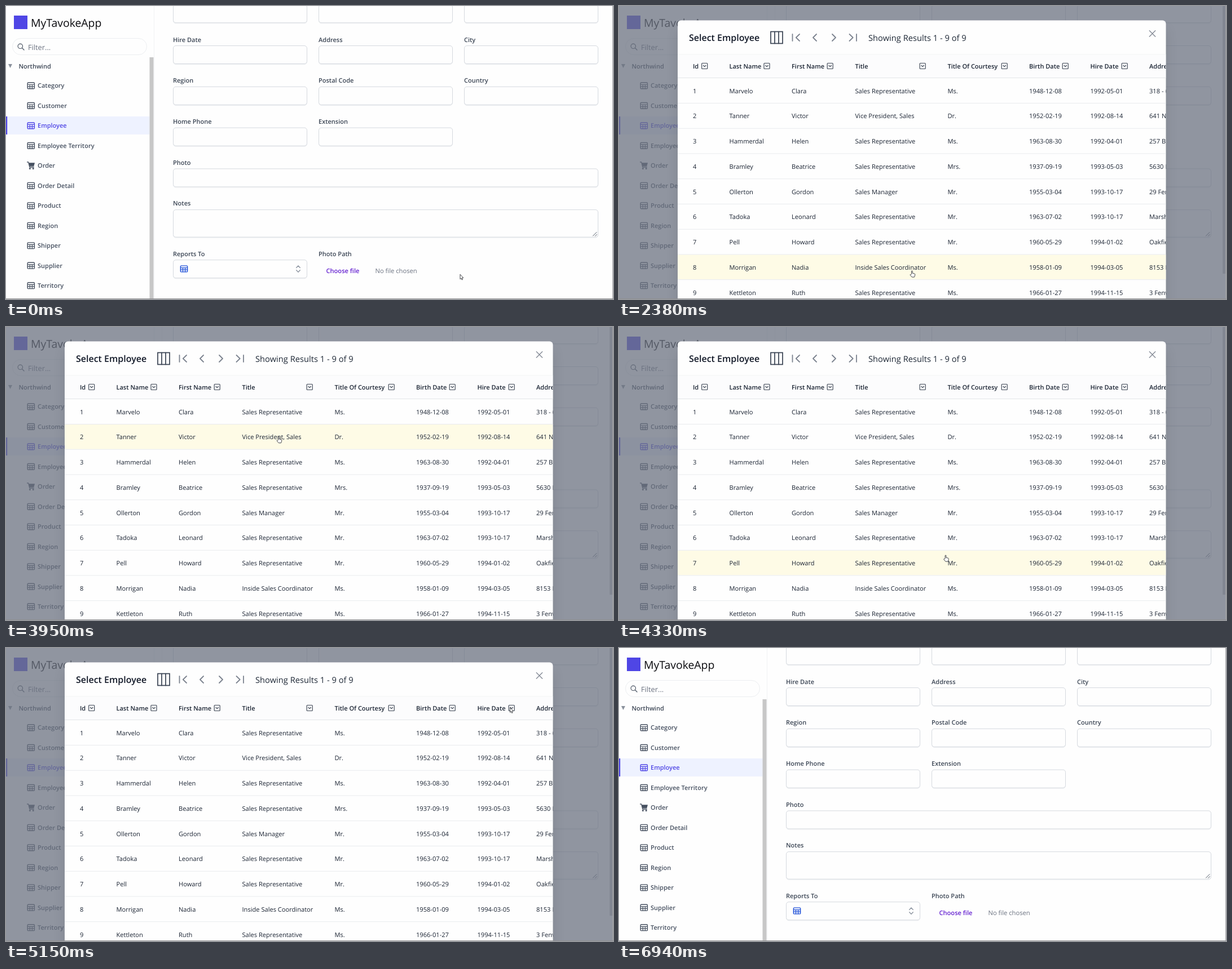
Write an HTML page that moves like this. It is 1076x520 px and loops after 7150 ms.

```html
<!DOCTYPE html>
<html lang="en">
<head>
<meta charset="utf-8">
<title>Employee picker</title>
<style>
  html, body { margin: 0; width: 100%; height: 100%; overflow: hidden; background: #fefefe; }
  svg { display: block; width: 100%; height: 100%; }
  text { font: 11px "Open Sans", "Noto Sans", sans-serif; text-rendering: geometricPrecision; white-space: pre; }
  .semi { font-weight: 600; }
  .line { fill: none; stroke-linecap: round; stroke-linejoin: round; }
  .field { fill: #fefefe; stroke: #d5d9df; }
  .modal-card { filter: drop-shadow(0 17px 10px rgba(0, 0, 0, .1)); }
</style>
</head>
<body>
<svg id="stage" viewBox="0 0 1076 520" xmlns="http://www.w3.org/2000/svg"></svg>
<script>
const LOOP = 7150;
const ROW_TOP = 128, ROW_HEIGHT = 44.75;
const INDIGO = '#4f46e5';

// Markup helpers
const text = (x, y, content, color, { size = 11, semi = false } = {}) =>
  `<text x="${x}" y="${y}" fill="${color}" style="font-size:${size}px"${semi ? ' class="semi"' : ''}>${content}</text>`;
const rect = (x, y, w, h, attrs) => `<rect x="${x}" y="${y}" width="${w}" height="${h}" ${attrs}/>`;
const line = (d, color, width = 1) => `<path class="line" d="${d}" stroke="${color}" stroke-width="${width}"/>`;
const label = (x, y, content) => text(x, y, content, '#3b4554', { semi: true });
const tableIcon = (x, y, color) => `<g transform="translate(${x} ${y})">` +
  rect(.7, .7, 12.2, 10.8, `rx="1.2" fill="none" stroke="${color}" stroke-width="1.4"`) +
  line('M.7 4.2H13M.7 7.8H13M4.8 4.2V11.4M8.9 4.2V11.4', color, 1.2) + '</g>';
const cartIcon = (x, y, color) => `<g transform="translate(${x} ${y})" fill="${color}">
  <path d="M3.3 2H14L12.3 8.2H4.7z"/><circle cx="5.4" cy="12.4" r="1.5"/><circle cx="11.2" cy="12.4" r="1.5"/>
  ${line('M.6.8H2.7L4.9 9.8H12.2', color, 1.3)}</g>`;
const field = (x, y, w = 237, h = 32) =>
  rect(x + .5, y + 1.5, w, h, 'rx="4.5" fill="none" stroke="#eceef1"') +
  rect(x + .5, y + .3, w, h, 'rx="4.5" class="field"');

function sidebar() {
  const items = ['Category', 'Customer', 'Employee', 'Employee Territory', 'Order', 'Order Detail',
    'Product', 'Region', 'Shipper', 'Supplier', 'Territory'];
  const list = items.map((name, i) => {
    const y = 141.3 + 35.48 * i;
    const color = name === 'Employee' ? INDIGO : '#465060';
    const icon = name === 'Order' ? cartIcon(37, y - 7, color) : tableIcon(37.5, y - 6, color);
    return icon + text(56, y + 4, name, color, { semi: true });
  }).join('');
  return rect(14, 17, 24, 24, `fill="${INDIGO}"`) +
    text(44, 37.2, 'MyTavokeApp', '#0b0b0f', { size: 19.4 }) +
    rect(11.5, 57.5, 238, 29, 'rx="14.5" fill="#fefefe" stroke="#eceef1"') +
    '<circle cx="25.3" cy="71.3" r="4.2" fill="none" stroke="#4b5563" stroke-width="1.2"/>' +
    line('M28.5 74.5L32 78', '#4b5563', 1.3) +
    text(39, 77.6, 'Filter...', '#6b7280', { size: 12.8 }) +
    '<path d="M4 103h7l-3.5 7z" fill="#8b929d"/>' +
    label(22.5, 111.3, 'Northwind') +
    rect(0, 196, 254.5, 32, 'fill="#eef2ff"') + rect(0, 196, 2.2, 32, `fill="${INDIGO}"`) + list +
    rect(254.5, 91, 7, 429, 'fill="#c7c7c7"') + rect(262, 0, 1, 520, 'fill="#f1f2f4"');
}

function form() {
  const columns = [296, 554, 812];
  const rows = [['', '', ''], ['Hire Date', 'Address', 'City'],
    ['Region', 'Postal Code', 'Country'], ['Home Phone', 'Extension']];
  const grid = rows.map((names, r) => names.map((name, c) => {
    const y = 70.2 + 72.8 * (r - 1);
    return label(columns[c], y - 6.7, name) + field(columns[c], y);
  }).join('')).join('');
  return grid +
    label(296, 281.8, 'Photo') + field(296, 288.6, 753) +
    label(296, 354.3, 'Notes') + field(296, 361.3, 753, 48.5) +
    line('M1040.5 408L1047 401.5M1044.5 408.3L1047.3 405.5', '#4b5563', 1) +
    label(296, 443.8, 'Reports To') + field(296, 450.4) +
    rect(296.7, 450.7, 237, 32, `id="selectRing" rx="4.5" fill="none" stroke="${INDIGO}" stroke-width="1.8"`) +
    tableIcon(308.7, 460.4, '#1d4ed8') +
    line('M514.7 464.5L518 461L521.3 464.5M514.7 468.7L518 472.2L521.3 468.7', '#8d95a1', 1.4) +
    label(554, 443.8, 'Photo Path') +
    `<g id="softParts">${rect(554, 454.5, 86.5, 30.5, 'rx="15.2" fill="#f5f3ff"')}
      ${rect(276, 0, 1, 503, 'fill="#f3f3f5"')}${rect(1070, 0, 5.5, 475, 'fill="#c7c7c7"')}</g>` +
    text(567.5, 474, 'Choose file', '#6420d0', { size: 11.1, semi: true }) +
    text(654.5, 474, 'No file chosen', '#6b7280', { size: 11.2 });
}

function modal() {
  const columnX = [131, 195.5, 306, 418.5, 582.5, 727, 835.5, 940];
  const headings = ['Id', 'Last Name', 'First Name', 'Title', 'Title Of Courtesy', 'Birth Date', 'Hire Date', 'Address'];
  const rep = 'Sales Representative';
  const people = [
    ['Marvelo', 'Clara', rep, 'Ms.', '1948-12-08', '1992-05-01', '318 - 6th'],
    ['Tanner', 'Victor', 'Vice President, Sales', 'Dr.', '1952-02-19', '1992-08-14', '641 N. Row'],
    ['Hammerdal', 'Helen', rep, 'Ms.', '1963-08-30', '1992-04-01', '257 Birch'],
    ['Bramley', 'Beatrice', rep, 'Mrs.', '1937-09-19', '1993-05-03', '5630 Low'],
    ['Ollerton', 'Gordon', 'Sales Manager', 'Mr.', '1955-03-04', '1993-10-17', '29 Fern'],
    ['Tadoka', 'Leonard', rep, 'Mr.', '1963-07-02', '1993-10-17', 'Marsh End'],
    ['Pell', 'Howard', rep, 'Mr.', '1960-05-29', '1994-01-02', 'Oakfield'],
    ['Morrigan', 'Nadia', 'Inside Sales Coordinator', 'Ms.', '1958-01-09', '1994-03-05', '8153 Elm'],
    ['Kettleton', 'Ruth', rep, 'Ms.', '1966-01-27', '1994-11-15', '3 Fenway'],
  ];
  const filters = [151.7, 262, 374.2, 538.2, 683.2, 791.2, 896.2].map(x =>
    rect(x - 5, 101.5, 10, 10, 'rx="1" fill="none" stroke="#3f4856" stroke-width="1.2"') +
    line(`M${x - 2.2} 105.5l2.2 2.2 2.2-2.2`, '#3f4856', 1.2)).join('');
  const body = people.map((person, r) => {
    const y = ROW_TOP + ROW_HEIGHT * r;
    return rect(104, y + ROW_HEIGHT - .8, 865.5, 1, 'fill="#e9ebee"') +
      [r + 1, ...person].map((cell, c) => text(columnX[c], y + 26.7, cell, '#1b2433', { size: 11.1 })).join('');
  }).join('');
  return rect(104, 25.4, 865.5, 570, 'rx="6" fill="#fefefe" class="modal-card"') +
    '<g clip-path="url(#card)">' +
    rect(104, 86, 865.5, 42, 'fill="#fcfcfd"') + rect(104, 85.5, 865.5, 1, 'fill="#f4f5f6"') +
    rect(104, 127, 865.5, 1, 'fill="#e3e5e9"') +
    rect(104, 0, 865.5, ROW_HEIGHT - .8, 'id="rowHover" fill="#fefbe6"') +
    headings.map((h, c) => text(columnX[c], 111, h, '#1b2433', { semi: true })).join('') +
    filters + body + '</g>' +
    text(124, 62.2, 'Select Employee', '#111827', { size: 16, semi: true }) +
    rect(269, 45.5, 21, 21, 'fill="none" stroke="#374151" stroke-width="1.7"') +
    line('M276 45.5V66.5M283 45.5V66.5', '#374151', 1.7) +
    line('M307.5 50V62M320 50L313.8 56L320 62M350 50L344 56L350 62M378 50L384 56L378 62M408.5 50L414.7 56L408.5 62M421 50V62',
      '#7c838f', 1.8) +
    text(442, 61.8, 'Showing Results 1 - 9 of 9', '#1f2937', { size: 14.7 }) +
    line('M940.3 43.8L950.7 54.2M950.7 43.8L940.3 54.2', '#858b96', 1.4) +
    rect(932.5, 36, 26, 26, 'id="closeRing" rx="6" fill="none" stroke="#6366f1" stroke-width="1.7"');
}

const stage = document.getElementById('stage');
stage.innerHTML = `<defs><clipPath id="card">${rect(104, 25.4, 865.5, 570, 'rx="6"')}</clipPath></defs>` +
  rect(0, 0, 1076, 520, 'fill="#fefefe"') + sidebar() + form() +
  rect(0, 0, 1076, 520, 'id="overlay" fill="#6b7280"') +
  `<g id="modal">${modal()}</g>` +
  `<g id="cursor" fill="#fff" stroke="#2f3136" stroke-width=".9" stroke-linejoin="round">
    <path id="arrow" d="M.5.3V8.8L2.4 7.2 3.7 10 5 9.4 3.8 6.7 6.2 6.3z"/>
    <path id="hand" d="M3 6.5V1.6c0-1.3 1.8-1.3 1.8 0V5l3.5.8c.8.2 1.1.7 1 1.5L8.8 9.8 8 11.8H3.8L.7 8.2c-.5-.9.5-1.5 1.2-.9z"/>
  </g>` +
  rect(1075, 0, 1, 520, 'fill="#a3a3a5"') + rect(0, 519, 1076, 1, 'fill="#8f8f92"');

const part = id => document.getElementById(id);
const show = (id, visible) => part(id).setAttribute('visibility', visible ? 'inherit' : 'hidden');

// Pointer path: time, x, y
const path = [
  [0, 804.5, 476], [300, 804.5, 476], [660, 690, 428], [1050, 529, 464], [1340, 515.5, 469.3],
  [2890, 515.5, 469.3], [3250, 500, 330], [3610, 476, 156], [3670, 475, 154], [3840, 475, 154],
  [3950, 479.5, 193.5], [4250, 550, 385], [4450, 615, 418], [4600, 660, 395], [4770, 701, 288.5],
  [5050, 840, 140], [5330, 956, 61], [5450, 943, 46], [5570, 944.5, 50.8], [6260, 944.5, 50.8],
  [6500, 1005, 270], [6790, 1062, 495], [6940, 1064, 521], [LOOP, 1064, 521],
];

// Monotone cubic interpolation: smooth, without overshoot at rests
function along(t, axis) {
  const slope = i => i < 0 || i >= path.length - 1 ? 0
    : (path[i + 1][axis] - path[i][axis]) / (path[i + 1][0] - path[i][0]);
  const tangent = i => {
    const a = slope(i - 1), b = slope(i);
    return a * b <= 0 ? 0 : 2 * a * b / (a + b);
  };
  const i = path.findIndex((_, k) => t < path[k + 1][0]);
  const span = path[i + 1][0] - path[i][0];
  const u = (t - path[i][0]) / span, v = 1 - u;
  return v * v * (1 + 2 * u) * path[i][axis] + u * u * (3 - 2 * u) * path[i + 1][axis] +
    span * u * v * (v * tangent(i) - u * tangent(i + 1));
}

const progress = (t, start, duration) => Math.min(1, Math.max(0, (t - start) / duration));

function render(t) {
  const x = along(t, 1), y = along(t, 2);
  const entered = 1 - (1 - progress(t, 2100, 280)) ** 3;
  const left = progress(t, 6042, 200) ** 1.7;
  const openness = entered * (1 - left);
  const scale = .95 + .05 * openness;

  show('softParts', t >= 1680 && t < 6300);
  show('selectRing', t >= 1680 && t < 2380);
  show('closeRing', t >= 5790);
  show('modal', openness > 0);
  part('overlay').setAttribute('opacity', .75 * openness);
  part('modal').setAttribute('opacity', openness);
  part('modal').setAttribute('transform', `translate(536.75 310) scale(${scale}) translate(-536.75 -310)`);

  const row = Math.floor((y - ROW_TOP) / ROW_HEIGHT);
  const overRow = t > 2140 && t < 6042 && row >= 0;
  part('rowHover').setAttribute('y', ROW_TOP + ROW_HEIGHT * row);
  show('rowHover', overRow);

  const overSelect = t > 1000 && t <= 2140;
  const overClose = t > 5300 && t < 6242;
  const pointing = overRow || overSelect || overClose;
  show('hand', pointing);
  show('arrow', !pointing);
  show('cursor', t < 6940);
  part('cursor').setAttribute('transform', `translate(${x} ${y})`);
}

function tick() {
  render(performance.now() % LOOP);
  requestAnimationFrame(tick);
}
tick();
</script>
</body>
</html>
```
